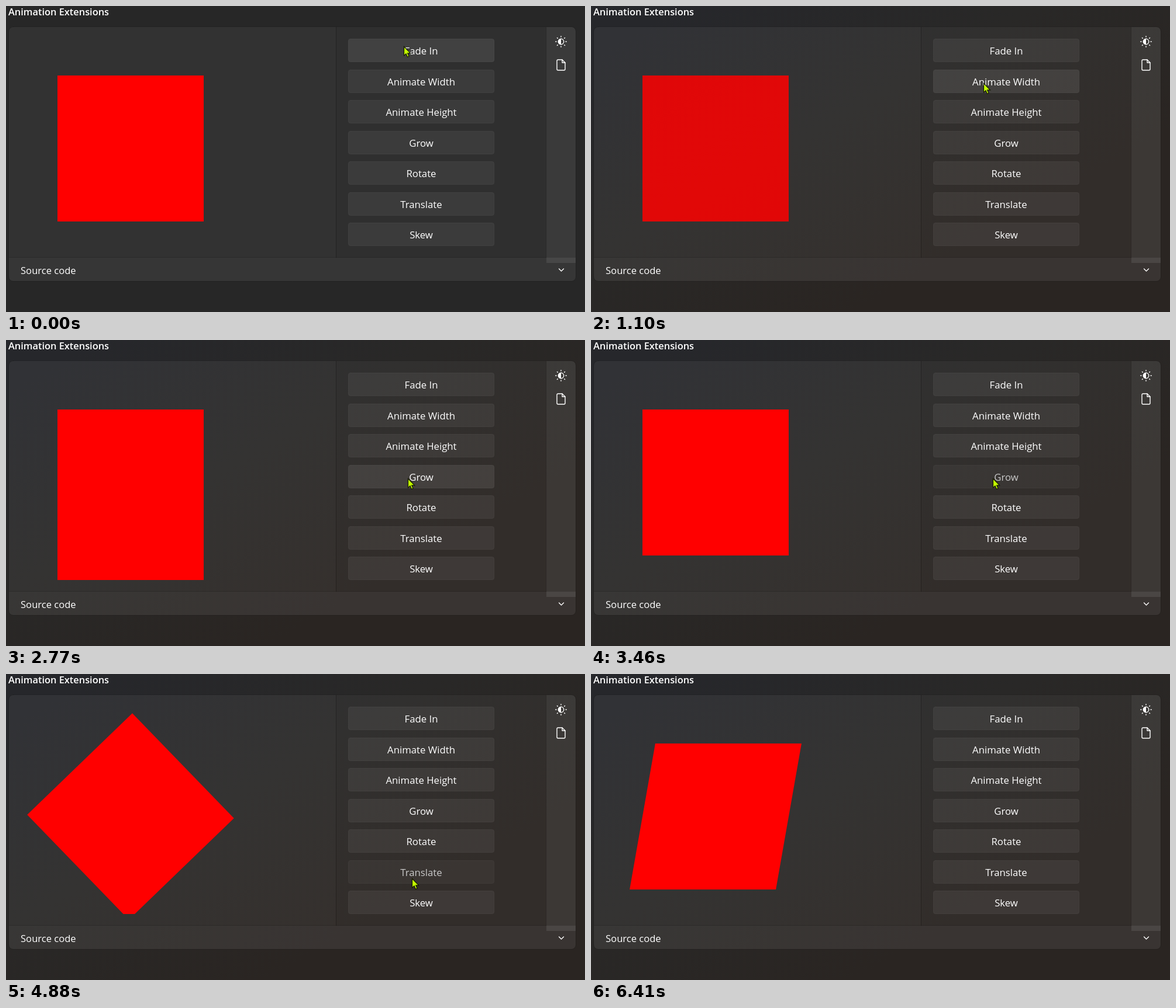
These frames come from a looping animation (990 by 524 pixels, 6480 ms). An HTML page with a canvas:

```html
<!DOCTYPE html>
<html lang="en">
<head>
<meta charset="utf-8">
<title>Animation Extensions</title>
<style>
  html, body { margin: 0; width: 100%; height: 100%; overflow: hidden; background: #272727; }
  #stage { position: relative; width: 990px; height: 524px; overflow: hidden;
    font: 16.75px/24px "Open Sans", "Noto Sans", sans-serif; color: #fff; }
  #stage > * { position: absolute; left: 0; top: 0; }
  .label { white-space: pre; }
  #stage .button { left: 585px; width: 250px; text-align: center; }
  #stage .title { left: 4px; top: -2px; font-size: 16.4px; font-weight: 600; }
  #stage .code { left: 25px; top: 441px; font-size: 16.6px; }
  #ripple { width: 30px; height: 30px; margin: -15px; border-radius: 50%; background: rgba(255, 255, 0, .4); }
  #pointer { overflow: visible; }
</style>
</head>
<body>
<div id="stage">
  <canvas id="view" width="990" height="524"></canvas>
  <div class="label title">Animation Extensions</div>
  <div class="label code">Source code</div>
  <div id="ripple"></div>
  <svg id="pointer" width="14" height="20">
    <path d="M0.5 0.5V16L4 12.8L6.4 18.3L9 17.2L6.7 11.9H11.6Z" fill="#c4ff00" stroke="#161a00" stroke-width="1.2"/>
  </svg>
</div>
<script>
const LOOP = 6480;
const NAMES = ["Fade In", "Animate Width", "Animate Height", "Grow", "Rotate", "Translate", "Skew"];
// start and length of each there-and-back move, in button order
const RUNS = [[278, 890], [1548, 800], [2334, 800], [3485, 800], [4185, 793], [4985, 800], [5810, 800]];
// time, x, y of the pointer tip
const PATH = [
  [0, 680, 69], [900, 680, 69], [1080, 671, 132], [1720, 671, 132], [2130, 678, 182],
  [2420, 678, 182], [2640, 711, 231], [2770, 687, 237], [3640, 687, 237], [3950, 687, 294],
  [4480, 687, 294], [4740, 694, 350], [5200, 694, 350], [5500, 698, 389],
  [5920, 698, 389], [6220, 800, 535], [LOOP, 800, 535]
];
const stage = document.getElementById("stage");
const ripple = document.getElementById("ripple");
const pointer = document.getElementById("pointer");
const ctx = document.getElementById("view").getContext("2d");

const clamp = v => Math.max(0, Math.min(1, v));
const buttonTop = i => Math.floor(56.5 + 52.5 * i);
const white = a => `rgba(255,255,255,${a})`;

const labels = NAMES.map((name, i) => {
  const el = document.createElement("div");
  el.className = "label button";
  el.textContent = name;
  el.style.top = buttonTop(i) + 9 + "px";
  stage.insertBefore(el, ripple);
  return el;
});

const wash = ctx.createLinearGradient(150, 0, 450, 524);
wash.addColorStop(0, "#26272b");
wash.addColorStop(0.5, "#292827");
wash.addColorStop(1, "#2a2522");

// 0 to 1 and back to 0
function swing(i, t) {
  const [start, length] = RUNS[i];
  const p = clamp((t - start) / length);
  return 1 - Math.abs(2 * p - 1);
}

function pointerAt(t) {
  const n = Math.max(1, PATH.findIndex(p => p[0] > t));
  const [a, b] = [PATH[n - 1], PATH[n]];
  const p = clamp((t - a[0]) / (b[0] - a[0]));
  const e = p * p * (3 - 2 * p);
  return [a[1] + (b[1] - a[1]) * e, a[2] + (b[2] - a[2]) * e];
}

function box(x, y, w, h, fill, radius = 0) {
  ctx.fillStyle = fill;
  ctx.beginPath();
  ctx.roundRect(x, y, w, h, radius);
  ctx.fill();
}

function line(points) {
  ctx.beginPath();
  points.forEach(([x, y]) => ctx.lineTo(x, y));
  ctx.stroke();
}

function drawIcons() {
  ctx.strokeStyle = ctx.fillStyle = "#fff";
  ctx.lineWidth = 1.4;
  ctx.lineCap = ctx.lineJoin = "round";
  ctx.beginPath();
  ctx.arc(949, 61, 4.7, 0, 7);
  ctx.stroke();
  ctx.beginPath();
  ctx.arc(949, 61, 4.7, Math.PI / 2, Math.PI * 1.5);
  ctx.fill();
  for (let i = 0; i < 8; i++) {
    const c = Math.cos(i * Math.PI / 4), s = Math.sin(i * Math.PI / 4);
    line([[949 + 8 * c, 61 + 8 * s], [949 + 9.3 * c, 61 + 9.3 * s]]);
  }
  ctx.beginPath();
  ctx.moveTo(951, 92);
  ctx.lineTo(944, 92);
  ctx.quadraticCurveTo(942, 92, 942, 94);
  ctx.lineTo(942, 108);
  ctx.quadraticCurveTo(942, 110, 944, 110);
  ctx.lineTo(954, 110);
  ctx.quadraticCurveTo(956, 110, 956, 108);
  ctx.lineTo(956, 97);
  ctx.closePath();
  ctx.stroke();
  line([[951, 92], [951, 97], [956, 97]]);
  line([[945.5, 450], [949.5, 454], [953.5, 450]]);
}

function drawPanels(t, hover, pressed) {
  box(0, 0, 990, 524, "#272727");
  ctx.globalAlpha = clamp((t - 280) / 250);
  box(0, 0, 990, 524, wash);
  ctx.globalAlpha = 1;

  box(5, 36, 559, 395, white(.052), [7, 0, 0, 0]);
  box(565, 36, 359, 395, white(.034));
  box(5, 431, 969, 40, white(.07), [0, 0, 7, 7]);
  box(924, 36, 50, 404, white(.088), [0, 7, 0, 0]);
  box(564, 36, 1, 395, "rgba(0,0,0,.1)");
  box(923, 36, 1, 395, "rgba(0,0,0,.1)");
  box(5, 430, 919, 1, "rgba(0,0,0,.15)");
  ctx.strokeStyle = "rgba(0,0,0,.12)";
  ctx.lineWidth = 1;
  ctx.beginPath();
  ctx.roundRect(4.5, 35.5, 970, 436, 8);
  ctx.stroke();

  NAMES.forEach((_, i) => {
    const y = buttonTop(i);
    const glow = i === pressed ? .04 : i === hover ? .085 : .058;
    box(585, y, 250, 40, white(glow), 4);
    ctx.strokeStyle = white(.022);
    ctx.beginPath();
    ctx.roundRect(585.5, y + .5, 249, 39, 4);
    ctx.stroke();
  });
}

function drawSquare(t) {
  const [fade, wide, tall, grow, turn, shift, skew] = RUNS.map((_, i) => swing(i, t));
  const scale = 1 - grow;
  ctx.save();
  ctx.beginPath();
  ctx.rect(25, 56, 519, 355);
  ctx.clip();
  ctx.globalAlpha = 1 - fade;
  ctx.translate(213 + 100 * shift, 244 + 100 * shift);
  ctx.rotate(-Math.PI * turn);
  ctx.transform(1, 0, -Math.tan(skew * Math.PI / 9), 1, 0, 0);
  box(-125, -125, (250 + 200 * wide) * scale, (250 + 200 * tall) * scale, "#f00");
  ctx.restore();
}

function draw(t) {
  const [x, y] = pointerAt(t);
  const hover = NAMES.findIndex((_, i) =>
    x >= 585 && x < 835 && y >= buttonTop(i) && y < buttonTop(i) + 40);
  const pressed = RUNS.findIndex(([s], i) => i && t >= s - 110 && t < s);
  const clicked = RUNS.some(([s]) => t >= s - 208 && t < s - 128);

  drawPanels(t, hover, pressed);
  drawIcons();
  drawSquare(t);
  labels.forEach((el, i) => { el.style.color = i === pressed ? "#c9c9c9" : "#fff"; });
  const place = `translate(${x}px, ${y}px)`;
  pointer.style.transform = ripple.style.transform = place;
  ripple.style.visibility = clicked ? "visible" : "hidden";
}

const begin = performance.now();
function frame() {
  draw((performance.now() - begin) % LOOP);
  requestAnimationFrame(frame);
}
frame();
</script>
</body>
</html>
```
